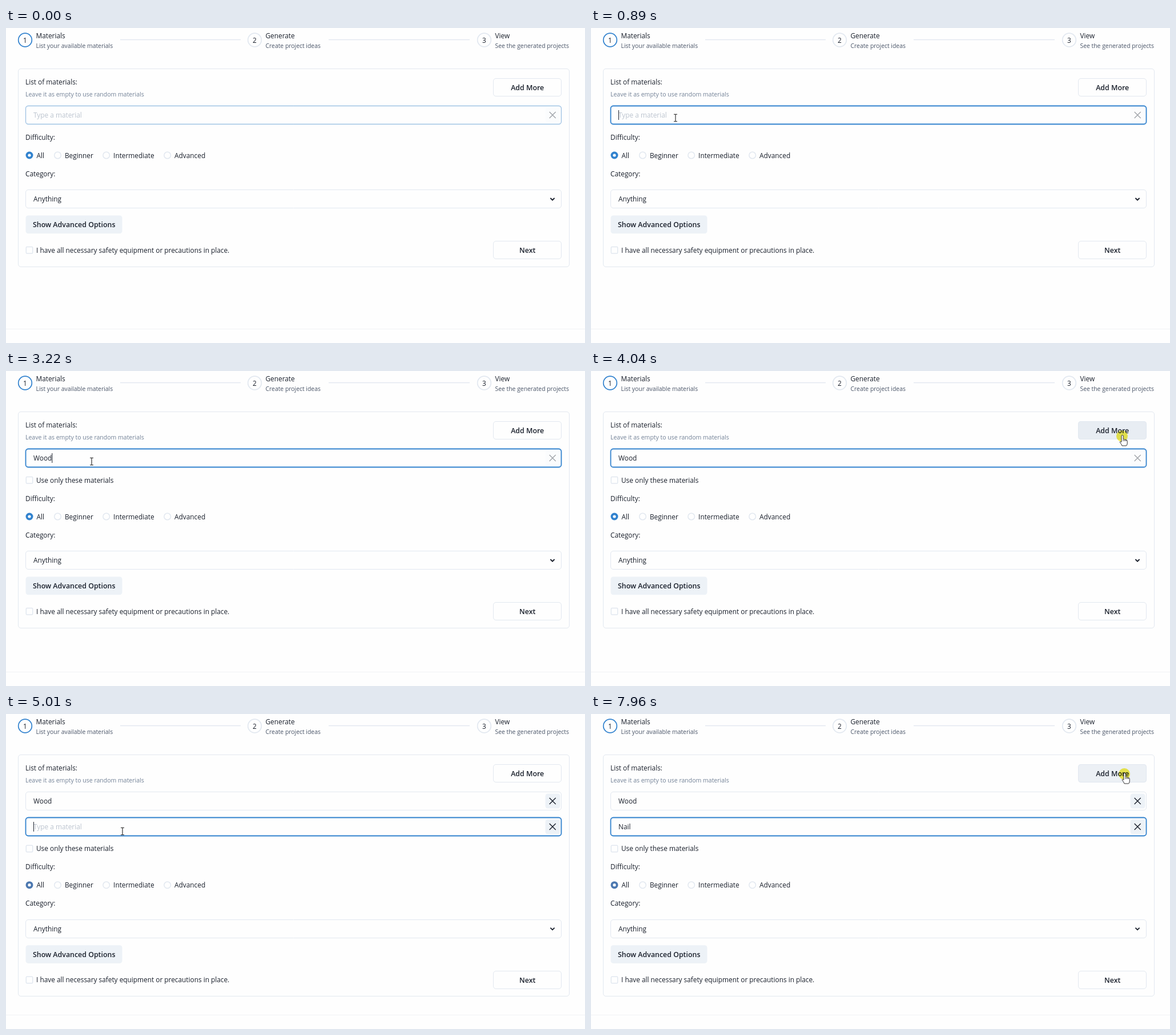
These frames come from a looping animation (1014x552 px, 8000 ms). An HTML page with a canvas:

```html
<!DOCTYPE html>
<html lang="en">
<head>
<meta charset="utf-8">
<title>Materials form</title>
<style>
html, body { margin: 0; height: 100%; overflow: hidden; background: #fefefe; }
canvas { display: block; }
</style>
</head>
<body>
<canvas id="stage" width="1014" height="552"></canvas>
<script>
const ctx = document.getElementById('stage').getContext('2d');
const LOOP = 8000, INK = '#1a202c', LINE = '#e2e8f0', BLUE = '#3182ce', GRAY = '#edf2f7';
const ARROW = new Path2D('M0 0V12.8L3 10.2L5 14.8L7 14L5.1 9.4H9Z');
const HAND = new Path2D('M-1 8V0a1.6 1.6 0 0 1 3.2 0V6q1.5-1 2.6.4q1.5-.8 2.4.5q2-.4 2 1.6V13q0 2-1.6 4H0q-1-3-4-6.5q.8-2 3 0Z');

// Pointer glides from ENTRY: start time, end time, destination
const ENTRY = [563, 522];
const GLIDES = [
  [67, 522, 148, 157.5],
  [2880, 3220, 150, 158.5],
  [3420, 3830, 930, 114],
  [4110, 4740, 204, 205.5],
  [5410, 5411, 295.5, 222],
  [7200, 7620, 988, 148],
  [7620, 7830, 934, 105]
];
const CLICKS = [740, 4030, 4800, 7890].map(t => [t, t + 145]);
const CARET = [[740, 1220], [1680, 2290], [2880, 4040], [4870, 5410], [5940, 7000]];

const within = (t, spans) => spans.some(([a, b]) => t >= a && t < b);
const fade = (t, a, b) => Math.min(1, Math.max(0, (t - a) / (b - a)));
const ease = u => u * u * (3 - 2 * u);
const typed = (word, t, keys) => word.slice(0, keys.filter(k => t >= k).length);

// Movement is sampled in steps, as in a screen recording
function stepped(t) {
  const [from, step] = t < 3420 ? [0, 67] : t < 7200 ? [3420, 69] : [7200, 69];
  return from + Math.floor((t - from) / step) * step;
}

function pointerAt(t) {
  let [x, y] = ENTRY;
  for (const [a, b, toX, toY] of GLIDES) {
    const u = ease(fade(t, a, b));
    x += (toX - x) * u;
    y += (toY - y) * u;
  }
  return [x, y];
}

function text(s, x, y, { size = 11.85, color = INK, weight = 400, align = 'left' } = {}) {
  ctx.font = `${weight} ${size}px "Open Sans", "Noto Sans", sans-serif`;
  ctx.fillStyle = color;
  ctx.textAlign = align;
  ctx.fillText(s, x, y);
  return ctx.measureText(s).width;
}

const bold = (s, x, y, align) => text(s, x, y, { size: 12.4, weight: 600, align });

function paint(fill, stroke, width = 1) {
  if (fill) { ctx.fillStyle = fill; ctx.fill(); }
  if (stroke) { ctx.strokeStyle = stroke; ctx.lineWidth = width; ctx.stroke(); }
}

function box(x, y, w, h, { r = 4.5, fill, stroke, width, alpha = 1 }) {
  ctx.globalAlpha = alpha;
  ctx.beginPath();
  ctx.roundRect(x, y, w, h, r);
  paint(fill, stroke, width);
  ctx.globalAlpha = 1;
}

function circle(x, y, r, fill, stroke, width) {
  ctx.beginPath();
  ctx.arc(x, y, r, 0, 7);
  paint(fill, stroke, width);
}

function lines(points, color, width) {
  ctx.beginPath();
  for (const [x1, y1, x2, y2] of points) { ctx.moveTo(x1, y1); ctx.lineTo(x2, y2); }
  paint(null, color, width);
}

function button(label, y, shade) {
  box(853.5, y + .5, 119, 31, { stroke: LINE });
  box(853, y, 120, 32, { fill: LINE, alpha: shade });
  bold(label, 913.2, y + 21.4, 'center');
}

function checkbox(label, y) {
  box(35.3, y - 5.7, 11.4, 11.4, { r: 1.5, stroke: LINE, width: 1.5 });
  text(label, 53, y + 4.4);
}

function field(y, value, focus, clear, caret) {
  box(34.5, y + .5, 938, 32, { stroke: LINE });
  box(34.5, y + .5, 938, 32, { stroke: BLUE, width: 1 + focus * .8, alpha: focus });
  const base = y + 21;
  if (!value) text('Type a material', 48, base, { color: '#bcc4cf' });
  const end = 48.5 + text(value, 48, base);
  if (caret) lines([[end, y + 8, end, y + 25]], INK, 1);
  box(944.5, y + 3.5, 26, 26, { fill: GRAY, alpha: clear * clear });
  ctx.globalAlpha = clear;
  lines([[951.7, y + 11, 962.7, y + 22], [962.7, y + 11, 951.7, y + 22]], INK, 1.4);
  ctx.globalAlpha = 1;
}

function stepper() {
  const steps = [
    ['Materials', 'List your available materials'],
    ['Generate', 'Create project ideas'],
    ['View', 'See the generated projects']
  ];
  steps.forEach(([title, note], i) => {
    const x = 33.5 + 402 * i;
    circle(x, 21, 11.8, null, i ? LINE : BLUE, 1.7);
    text(i + 1, x, 26, { align: 'center' });
    text(title, x + 19, 17.5);
    text(note, x + 19, 35, { size: 10.4, color: '#4a5568' });
  });
  lines([[200, 20.5, 411, 20.5], [565, 20.5, 812, 20.5]], LINE, 1.6);
}

function options(y, dot) {
  text('Difficulty:', 34, y + 195.5);
  circle(41, y + 223, 6.5, dot);
  circle(41, y + 223, 2.6, '#fff');
  text('All', 53.4, y + 227.5);
  let x = 90.5;
  for (const level of ['Beginner', 'Intermediate', 'Advanced']) {
    circle(x, y + 223, 5.8, null, LINE, 1.5);
    x += 35.4 + text(level, x + 12.4, y + 227.5);
  }
  text('Category:', 34, y + 259.5);
  box(34.5, Math.round(y + 284) - .5, 938, 32, { stroke: LINE });
  text('Anything', 48, y + 304.3);
  lines([[953.4, y + 298, 957.4, y + 302], [956.6, y + 302, 960.6, y + 298]], INK, 1.8);
  box(34.5, y + 328.5, 169, 31.7, { fill: GRAY });
  bold('Show Advanced Options', 47, y + 349.3);
  checkbox('I have all necessary safety equipment or precautions in place.', y + 389.3);
  button('Next', Math.round(y + 373), 0);
}

function pointer(t, rows) {
  const at = stepped(t);
  if (at < 67) return;
  const [x, y] = pointerAt(at);
  if (within(t, CLICKS)) {
    ctx.globalCompositeOperation = 'multiply';
    circle(x, y, 10, '#f6ee50');
    ctx.globalCompositeOperation = 'source-over';
  }
  const overField = x > 34 && x < 944 && rows.some(top => y > top && y < top + 32);
  const overAdd = x > 853 && x < 973 && y > 88 && y < 120;
  ctx.save();
  ctx.translate(x, y);
  if (overField) {
    lines([[0, -6, 0, 6], [-3, -6.3, 3, -6.3], [-3, 6.3, 3, 6.3]], '#222', 1.1);
  } else {
    const shape = overAdd ? HAND : ARROW;
    ctx.fillStyle = '#fff';
    ctx.strokeStyle = '#333';
    ctx.lineWidth = 1;
    ctx.fill(shape);
    ctx.stroke(shape);
    if (overAdd) lines([2.2, 4.8, 7.2].map(k => [k, 6.5, k, 9]), '#333', 1);
  }
  ctx.restore();
}

function draw(t) {
  const filled = t >= 1680, second = t >= 4248;
  const shift = second ? 76.7 : filled ? 32 : 0;
  const caret = within(t, CARET);
  const focus1 = t < 67 ? .4 : fade(t, 740, 890) - fade(t, 4040, 4179);
  const hover = fade(t, 3800, 3900) + fade(t, 7800, 7880);
  const shade = .6 * hover + .4 * fade(t, 4030, 4060) - fade(t, 4210, 4400);

  ctx.fillStyle = '#fefefe';
  ctx.fillRect(0, 0, 1014, 552);
  stepper();
  lines([[0, 527.5, 1014, 527.5]], '#f1f3f6', 1);
  box(21.5, 71.5, 965, Math.round(shift + 346.5), { stroke: LINE });

  text('List of materials:', 34, 99);
  text('Leave it as empty to use random materials', 34, 120, { size: 10.5, color: '#718096' });
  button('Add More', 88, Math.max(0, shade));

  field(136, typed('Wood', t, [1680, 1880, 2090, 2880]), focus1, .4 + .6 * fade(t, 4180, 4360), caret && !second);
  if (second) field(181, typed('Nail', t, [5940, 6210, 6470, 6670]), fade(t, 4870, 5005), 1, caret);
  if (filled) checkbox('Use only these materials', second ? 236 : 191.2);
  options(shift, second ? '#4c78b0' : BLUE);
  pointer(t, second ? [137, 181] : [137]);
}

const start = performance.now();
function tick() {
  draw((performance.now() - start) % LOOP);
  requestAnimationFrame(tick);
}
tick();
</script>
</body>
</html>
```
